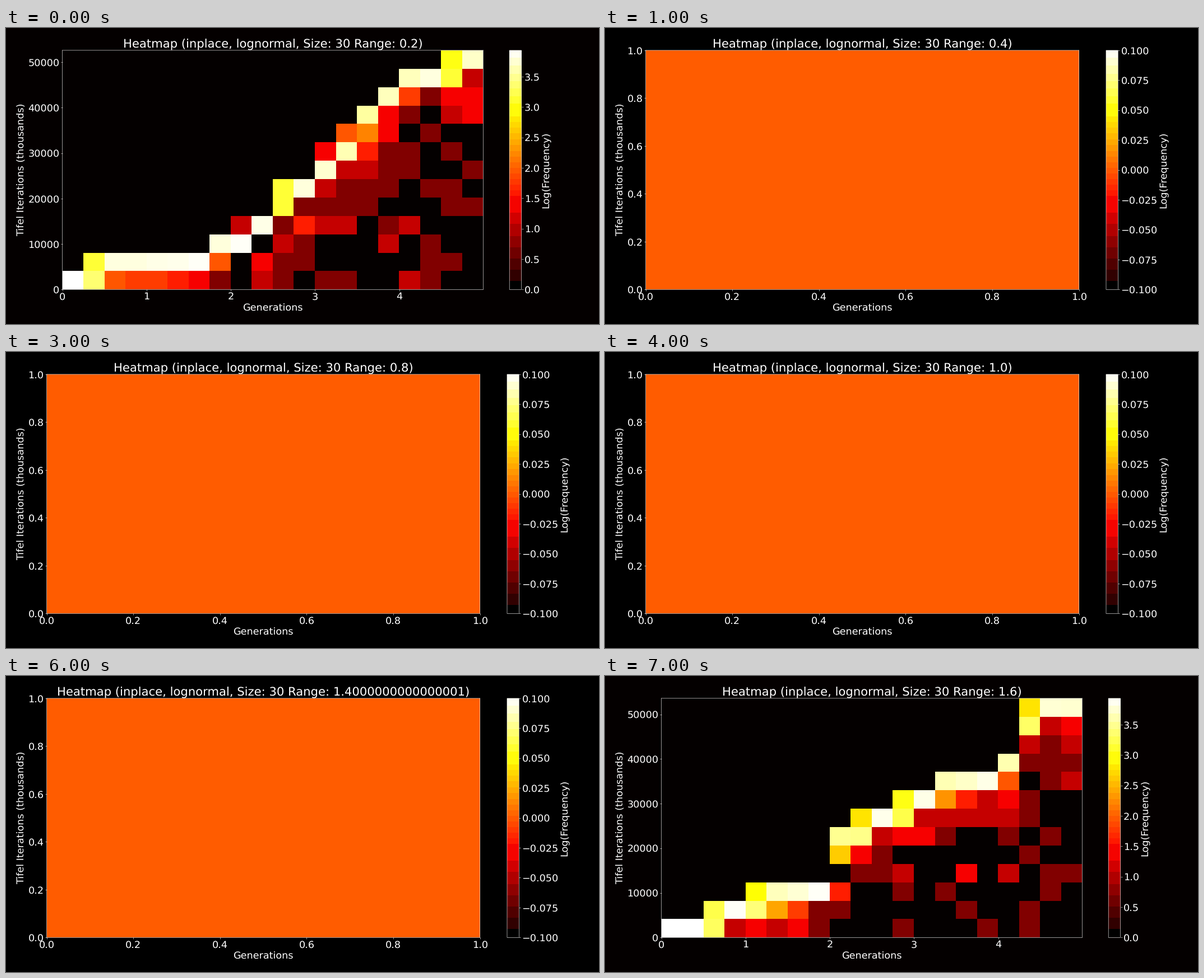
A matplotlib script for the animation above (8000 ms loop, 1058 px wide and 529 px high).

```python
import numpy as np
import matplotlib.pyplot as plt
from matplotlib.animation import FuncAnimation
from matplotlib.cm import ScalarMappable
from matplotlib.colors import ListedColormap, Normalize
from matplotlib.ticker import MultipleLocator

W, H, DPI = 1058, 529, 52.9
TOP, BOTTOM, RIGHT = 39.9, 467.3, 1038.95
ROWS, COLS, POPULATION = 13, 20, 50

# Key points (column, row) of the path the bulk of the population climbs.
EARLY = [(0, 0), (2, 0.87), (6, 0.95), (7, 1.88), (8, 2.05), (9, 3), (10, 4.5),
         (11, 5), (13, 7.15), (14, 8.8), (15, 10), (16, 10.88), (17, 11), (19, 11.95)]
LATE = [(0, 0), (1, 0), (3, 0.96), (5, 1.8), (7, 1.97), (8, 4.7), (10, 5.95),
        (12, 6.95), (13, 7.8), (15, 8), (16, 8.85), (17, 11.35), (18, 12), (19, 12)]
RUNS = {0: (EARLY, 52630), 7: (LATE, 53590)}

plt.style.use("dark_background")
plt.rcParams.update({
    "font.family": "DejaVu Sans",
    "font.size": 24,
    "text.hinting": "none",
})


def banded_hot():
    """The hot colormap merged into coarse bands of similar colour."""
    rgb = plt.get_cmap("hot")(np.linspace(0, 1, 256))[:, :3]
    keys = np.floor(rgb * 255 / [32, 16, 32]).astype(int) @ [1024, 32, 1]
    out = np.empty_like(rgb)
    for key in np.unique(keys):
        out[keys == key] = rgb[keys == key].mean(axis=0)
    out[keys == keys[0]] = 0
    return ListedColormap(out)


def climb(path, seed):
    """Log counts: a bulk that follows the path, random stragglers below it."""
    rng = np.random.default_rng(seed)
    rows = np.arange(ROWS)
    grid = np.zeros((ROWS, COLS))
    for col, front in enumerate(np.interp(np.arange(COLS), *zip(*path))):
        lag = np.floor(front) - rows
        rate = np.where(lag > 0, 0.3 + 2.2 * np.exp(-lag / 2), 0)
        tail = rng.poisson(rate)
        share = np.clip(1 - np.abs(rows - front), 0, 1)
        grid[:, col] = tail + np.round((POPULATION - tail.sum()) * share)
    return np.ma.masked_equal(np.log1p(grid), 0)


def draw(i):
    fig.clear()
    if i in RUNS:
        path, y_max = RUNS[i]
        values, x_max = climb(path, i), 4.995
        norm = Normalize(0, np.log1p(POPULATION))
        left, back = 100.6, "#040000"
        x_step, y_step, bar_step = 1, 10000, 0.5
    else:
        values, x_max, y_max = np.zeros((1, 1)), 1, 1
        norm = Normalize(-0.1, 0.1)
        left, back = 72.6, "black"
        x_step, y_step, bar_step = 0.2, 0.2, 0.025

    fig.set_facecolor(back)
    fig.subplots_adjust(left=left / W, right=RIGHT / W,
                        bottom=1 - BOTTOM / H, top=1 - TOP / H)
    ax = fig.add_subplot(facecolor=back)
    n_rows, n_cols = values.shape
    ax.pcolormesh(np.linspace(0, x_max, n_cols + 1),
                  np.linspace(0, y_max, n_rows + 1),
                  values, cmap="hot", norm=norm)
    ax.set(xlim=(0, x_max), ylim=(0, y_max))
    ax.xaxis.set_major_locator(MultipleLocator(x_step))
    ax.yaxis.set_major_locator(MultipleLocator(y_step))
    ax.set_xlabel("Generations", labelpad=5.5)
    ax.set_ylabel("Tifel Iterations (thousands)")
    ax.set_title(f"Heatmap (inplace, lognormal, Size: 30 Range: {0.2 + 0.2 * i})")

    bar = fig.colorbar(ScalarMappable(norm, BANDS), ax=ax,
                       ticks=MultipleLocator(bar_step))
    bar.set_label("Log(Frequency)")
    for line in [*ax.spines.values(), bar.outline]:
        line.set_snap(False)
    return []


BANDS = banded_hot()
fig = plt.figure(figsize=(W / DPI, H / DPI), dpi=DPI)
anim = FuncAnimation(fig, draw, frames=8, interval=1000, repeat=True,
                     repeat_delay=0, blit=False)
plt.show()
```
